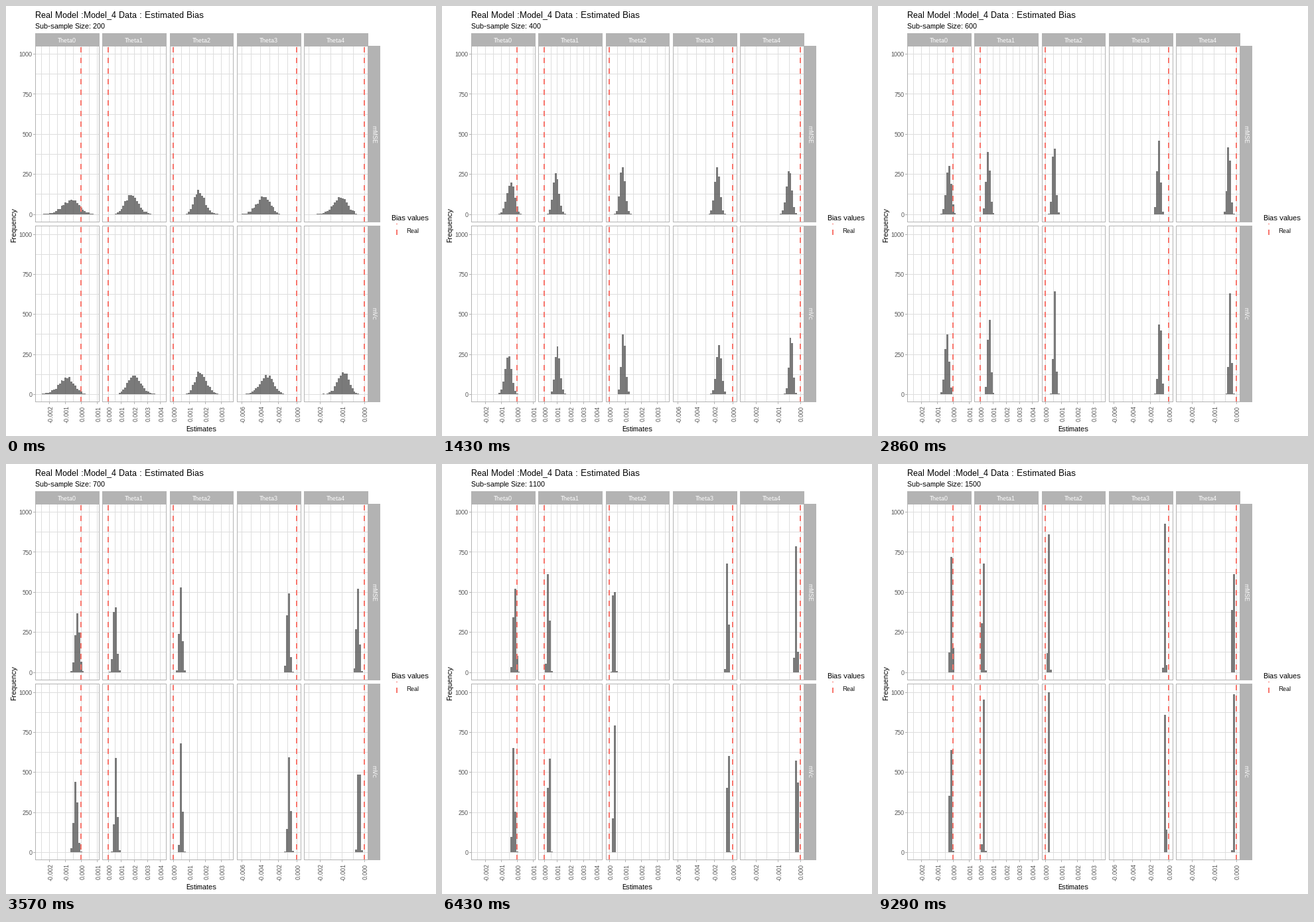
These frames come from a looping animation (648x648 px, 10 s). A matplotlib script:

```python
import math

import numpy as np
import matplotlib.pyplot as plt
from matplotlib.animation import FuncAnimation
from matplotlib.collections import LineCollection, PolyCollection
from matplotlib.patches import Rectangle

plt.rcParams["font.family"] = "Liberation Sans"
plt.rcParams["text.hinting"] = "native"
plt.rcParams["text.hinting_factor"] = 1

STAGE = 648
LOOP, TICK = 10000, 50
SIZES = range(200, 1501, 100)
BIN = 2.906          # bin width in pixels
UNIT = 0.2414        # pixels per count
DASH = 8
GRID, BORDER, BAR, RED = "#dedede", "#b3b3b3", "#595959", "#f8766d"
LABEL = "#4d4d4d"

# zero position, tick spacing, first and last tick, tick value
AXES = [
    (113.6, 24.2, -2, 1, 0.001),
    (154.2, 19.6, 0, 4, 0.001),
    (252.6, 24.1, 0, 3, 0.001),
    (438.4, 27.5, -3, 0, 0.002),
    (540.0, 33.5, -2, 0, 0.001),
]
# name, top, bottom, zero position, then one bias model per column:
# with r = 200 / n, mean = 1000 / n * (a + b r) and spread = 1000 / n * (c + d r) bins
ROWS = [
    ("mMSE", 60, 326, 314, [
        (-1.5, 0.38, 0.66, 0.24), (2.53, -0.07, 0.51, 0.19),
        (2.78, -0.04, 0.43, 0.14), (-2.87, -0.6, 0.37, 0.33),
        (-2.08, -0.4, 0.37, 0.4)]),
    ("mVc", 331, 597, 585.4, [
        (-2.12, 0.55, 0.5, 0.32), (2.86, -0.08, 0.31, 0.4),
        (2.99, -0.12, 0.2, 0.38), (-2.56, -0.55, 0.3, 0.4),
        (-1.6, -0.55, 0.2, 0.4)]),
]

fig = plt.figure(figsize=(9, 9), dpi=72, facecolor="white")
ax = fig.add_axes([0, 0, 1, 1])
ax.set_xlim(0, STAGE)
ax.set_ylim(STAGE, 0)
ax.axis("off")


def text(x, y, s, size=9, color="black", ha="left", angle=0):
    return ax.text(x, y, s, fontsize=size, color=color, ha=ha, va="baseline",
                   rotation=angle, rotation_mode="anchor")


def lines(segments, color, z, width=1):
    # snapping would move the half-pixel centres to the next pixel
    ax.add_collection(LineCollection(segments, colors=color, linewidths=width,
                                     snap=False, zorder=z))


def block(x0, y0, x1, y1):
    ax.add_patch(Rectangle((x0, y0), x1 - x0, y1 - y0, facecolor=BORDER,
                           edgecolor="none", antialiased=False, zorder=1))


def dashes(x, bottom, top):
    return [[(x, y), (x, max(y - DASH, top))]
            for y in range(bottom, top, -2 * DASH)]


def middle(v):
    return math.floor(v) + 0.5


def span(i):
    left = 44.3 + 101.4 * i
    return math.floor(left), math.floor(left + 95.8)


def grid_lines(i, top, bottom, base):
    left, right = span(i)
    zero, step, first, last, _ = AXES[i]
    for k in range(2 * first - 1, 2 * last + 2):
        x = middle(zero + k * step / 2)
        if left < x < right:
            yield [(x, top), (x, bottom)]
    for count in range(0, 1001, 125):
        y = middle(base - count * UNIT)
        yield [(left, y), (right, y)]


def frame_lines(i, top, bottom):
    left, right = span(i)
    for y in (top + 0.5, bottom - 0.5):
        yield [(left, y), (right + 1, y)]
    for x in (left + 0.5, right + 0.5):
        yield [(x, top), (x, bottom)]


def draw_static():
    text(44, 17, "Real Model :Model_4 Data : Estimated Bias", 13)
    text(294, 641, "Estimates", 11, ha="center")
    text(15, 330, "Frequency", 11, ha="center", angle=90)
    text(581, 323, "Bias values", 11)
    text(603, 342, "Real")

    grid, edges, ticks = [], [], []
    red = dashes(589, 345, 328)
    for i, (zero, step, first, last, value) in enumerate(AXES):
        left, right = span(i)
        block(left, 41, right + 1, 60)
        text((left + right) / 2 + 0.3, 55, f"Theta{i}", color="white", ha="center")
        for k in range(first, last + 1):
            x = zero + k * step
            ticks.append([(middle(x), 597), (middle(x), 600)])
            text(x + 5, 615, f"{k * value:.3f}", color=LABEL, ha="center", angle=90)
        for _, top, bottom, base, _ in ROWS:
            grid += grid_lines(i, top, bottom, base)
            edges += frame_lines(i, top, bottom)
            red += dashes(math.floor(zero), bottom, top)

    for name, top, bottom, base, _ in ROWS:
        block(545, top, 564, bottom)
        text(551, (top + bottom) / 2, name, color="white", ha="center", angle=-90)
        for count in range(0, 1001, 250):
            y = base - count * UNIT
            ticks.append([(41, middle(y)), (44, middle(y))])
            text(39.5, y + 3.6, str(count), color=LABEL, ha="right")

    lines(grid, GRID, 1)
    lines(ticks, BORDER, 1)
    lines(red, RED, 4, 2)
    lines(edges, BORDER, 5)


def cdf(z, skew):
    phi = np.exp(-z * z / 2) / math.sqrt(2 * math.pi)
    total = 0.5 * (1 + np.array([math.erf(v / math.sqrt(2)) for v in z]))
    return total - skew / 6 * (z * z - 1) * phi


def counts(bins, model, n, rng):
    a, b, c, d = model
    r = 200 / n
    mean, spread = 1000 / n * (a + b * r), 1000 / n * (c + d * r)
    skew = math.copysign(0.3, mean) * r
    h = np.clip(1000 * np.diff(cdf((bins - mean) / spread, skew)), 0, 1000)
    h += rng.normal(size=h.size) * np.sqrt(h) * 0.6 * r
    return np.clip(h, 0, 1000)


def bar_shapes(n):
    rng = np.random.default_rng(n)
    shapes = []
    for _, _, _, base, models in ROWS:
        foot = math.floor(base)
        for i, model in enumerate(models):
            left, right = span(i)
            zero = AXES[i][0]
            lo = math.ceil((left + 3 - zero) / BIN + 0.5)
            hi = math.floor((right - 3 - zero) / BIN - 0.5)
            bins = np.arange(lo, hi + 2) - 0.5
            xs = np.floor(zero + bins * BIN)
            heights = np.round(counts(bins, model, n, rng) * UNIT)
            for x0, x1, h in zip(xs, xs[1:], heights):
                if h > 0:
                    shapes.append([(x0, foot), (x0, foot - h),
                                   (x1, foot - h), (x1, foot)])
    return shapes


draw_static()
subtitle = text(44, 34, "", 11)
bars = PolyCollection([], facecolors=BAR, edgecolors="none", alpha=0.8,
                      antialiaseds=False, zorder=3)
ax.add_collection(bars, autolim=False)
shapes = [bar_shapes(n) for n in SIZES]


def update(i):
    # a step begins on the last tick at or before its exact time
    step = ((i + 1) * TICK - 1) * len(SIZES) // LOOP
    subtitle.set_text(f"Sub-sample Size: {SIZES[step]}")
    bars.set_verts(shapes[step])
    return subtitle, bars


anim = FuncAnimation(fig, update, frames=LOOP // TICK, init_func=lambda: update(0),
                     interval=TICK, repeat=True, blit=False)
plt.show()
```
